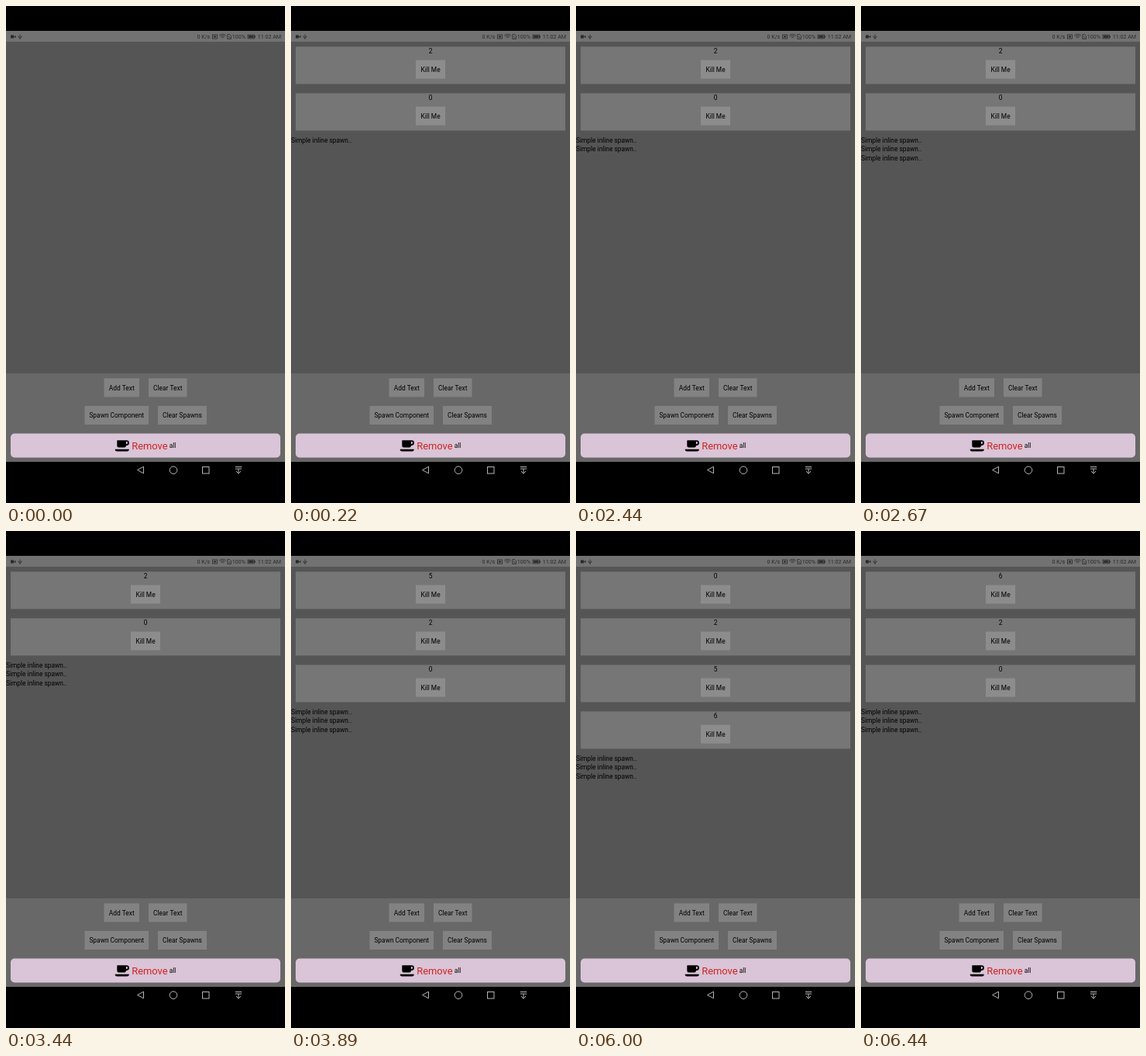
These frames come from a looping animation (360 by 640 pixels, 8000 ms). An HTML page with a canvas:

```html
<!DOCTYPE html>
<html lang="en">
<head>
<meta charset="utf-8">
<title>Spawn demo</title>
<style>
html, body { margin: 0; width: 100%; height: 100%; overflow: hidden; background: #000; }
canvas { display: block; width: 360px; height: 640px; }
</style>
</head>
<body>
<canvas id="stage"></canvas>
<script>
const canvas = document.getElementById('stage');
const ctx = canvas.getContext('2d');
const ratio = window.devicePixelRatio || 1;
canvas.width = 360 * ratio;
canvas.height = 640 * ratio;
ctx.scale(ratio, ratio);

const LOOP = 8000;
const BODY = 8.4;
const INK = '#000';

// Each state holds until the next start time.
const states = [
  { at: 0, cards: [], lines: 0 },
  { at: 110, cards: [2, 0], lines: 1 },
  { at: 2440, cards: [2, 0], lines: 2 },
  { at: 2670, cards: [2, 0], lines: 3 },
  { at: 3890, cards: [5, 2, 0], lines: 3 },
  { at: 4330, cards: [0, 2, 5, 6], lines: 3 },
  { at: 6330, cards: [6, 2, 0], lines: 3 }
];

function box(x, y, w, h, color) {
  ctx.fillStyle = color;
  ctx.fillRect(x, y, w, h);
}

function label(str, x, y, size = BODY, align = 'center', color = INK) {
  ctx.font = size + 'px Roboto, sans-serif';
  ctx.textAlign = align;
  ctx.textBaseline = 'alphabetic';
  ctx.fillStyle = color;
  ctx.fillText(str, x, y);
}

function button(str, x, y, w, color) {
  box(x, y, w, 24, color);
  label(str, x + w / 2, y + 15.3);
}

function path(points, close) {
  ctx.beginPath();
  points.forEach(([x, y], i) => i ? ctx.lineTo(x, y) : ctx.moveTo(x, y));
  if (close) ctx.closePath();
}

function line(points, close) {
  path(points, close);
  ctx.stroke();
}

function statusBar() {
  const ink = '#2a2a2a';
  box(0, 32, 360, 14, '#727272');
  box(6, 37.5, 4, 4, ink);
  path([[10, 39.5], [12.5, 37.8], [12.5, 41.2]], true);
  ctx.fill();
  ctx.strokeStyle = ink;
  ctx.lineWidth = 0.8;
  line([[18, 36.5], [18, 43]]);
  line([[16, 38.5], [16, 40], [18, 41.3], [20, 40], [20, 38.5]]);

  label('0 K/s', 246.5, 42, 7.1, 'left', ink);
  ctx.strokeRect(266.5, 37, 6, 5);
  box(268, 38.5, 3, 2, ink);
  for (const r of [2.2, 4.2, 6.2]) {
    ctx.beginPath();
    ctx.arc(279.5, 42.5, r, -Math.PI * 0.75, -Math.PI * 0.25);
    ctx.stroke();
  }
  line([[285.8, 36.6], [288.6, 36.6], [290.4, 38.4], [290.4, 42.4], [285.8, 42.4]], true);
  line([[287, 39], [289.2, 41.2]]);
  label('100%', 291.8, 42, 7.1, 'left', ink);
  ctx.strokeRect(312, 37.2, 8.5, 4.6);
  box(313, 38.2, 6.5, 2.6, ink);
  box(321, 38.5, 1, 2, ink);
  label('11:02 AM', 355, 42, 7.1, 'right', ink);
}

// Drawn in units of a hundredth of a pixel-sized grid, then scaled.
const cupShape = new Path2D(
  'M256 320q0-64 64-64H1472a288 288 0 0 1 0 672h-64v32q0 224-224 224H480q-224 0-224-224z' +
  'M1408 448v288h64a144 144 0 0 0 0-288z' +
  'M0 1408H1792q0 256-256 256H256q-256 0-256-256z'
);

function cup() {
  ctx.save();
  ctx.translate(140.7, 556.6);
  ctx.scale(0.0101, 0.0101);
  ctx.fillStyle = INK;
  ctx.fill(cupShape, 'evenodd');
  ctx.restore();
}

function panel() {
  const face = '#828282';
  box(0, 473, 360, 114, '#686868');
  button('Add Text', 126.5, 479.4, 45.5, face);
  button('Clear Text', 184, 479.4, 49.5, face);
  button('Spawn Component', 101.5, 515, 82.5, face);
  button('Clear Spawns', 196, 515, 63, face);

  ctx.fillStyle = '#dac4d7';
  ctx.beginPath();
  ctx.roundRect(6, 550.5, 348, 31, 5);
  ctx.fill();
  cup();
  label('Remove', 162.2, 571, 12.9, 'left', '#cf2420');
  label('all', 210.7, 569.3, BODY, 'left');
}

function navBar() {
  box(0, 587, 360, 53, '#000');
  ctx.strokeStyle = '#b4b4b4';
  ctx.lineWidth = 1;
  line([[169.5, 597.5], [177.5, 593.2], [177.5, 601.8]], true);
  ctx.beginPath();
  ctx.arc(216, 597.7, 4.8, 0, Math.PI * 2);
  ctx.stroke();
  ctx.strokeRect(253.5, 593.5, 8.5, 8.5);
  line([[295.8, 593.5], [304.2, 593.5]]);
  line([[295.8, 596], [304.2, 596]]);
  line([[300, 596], [300, 602]]);
  line([[297, 599], [300, 602.2], [303, 599]]);
}

function card(n, y) {
  box(6, y, 348, 48, '#767676');
  label(n, 180, y + 9);
  button('Kill Me', 161, y + 17.2, 38, '#8c8c8c');
}

function draw(t) {
  const { cards, lines } = states.findLast(s => s.at <= t);
  box(0, 0, 360, 640, '#000');
  box(0, 46, 360, 427, '#555');
  statusBar();
  cards.forEach((n, i) => card(n, 52.4 + i * 60));
  for (let i = 0; i < lines; i++) {
    label('Simple inline spawn..', 0, 55.8 + cards.length * 60 + i * 11.4, BODY, 'left');
  }
  panel();
  navBar();
}

const start = performance.now();
function tick() {
  draw((performance.now() - start) % LOOP);
  requestAnimationFrame(tick);
}
tick();
</script>
</body>
</html>
```
